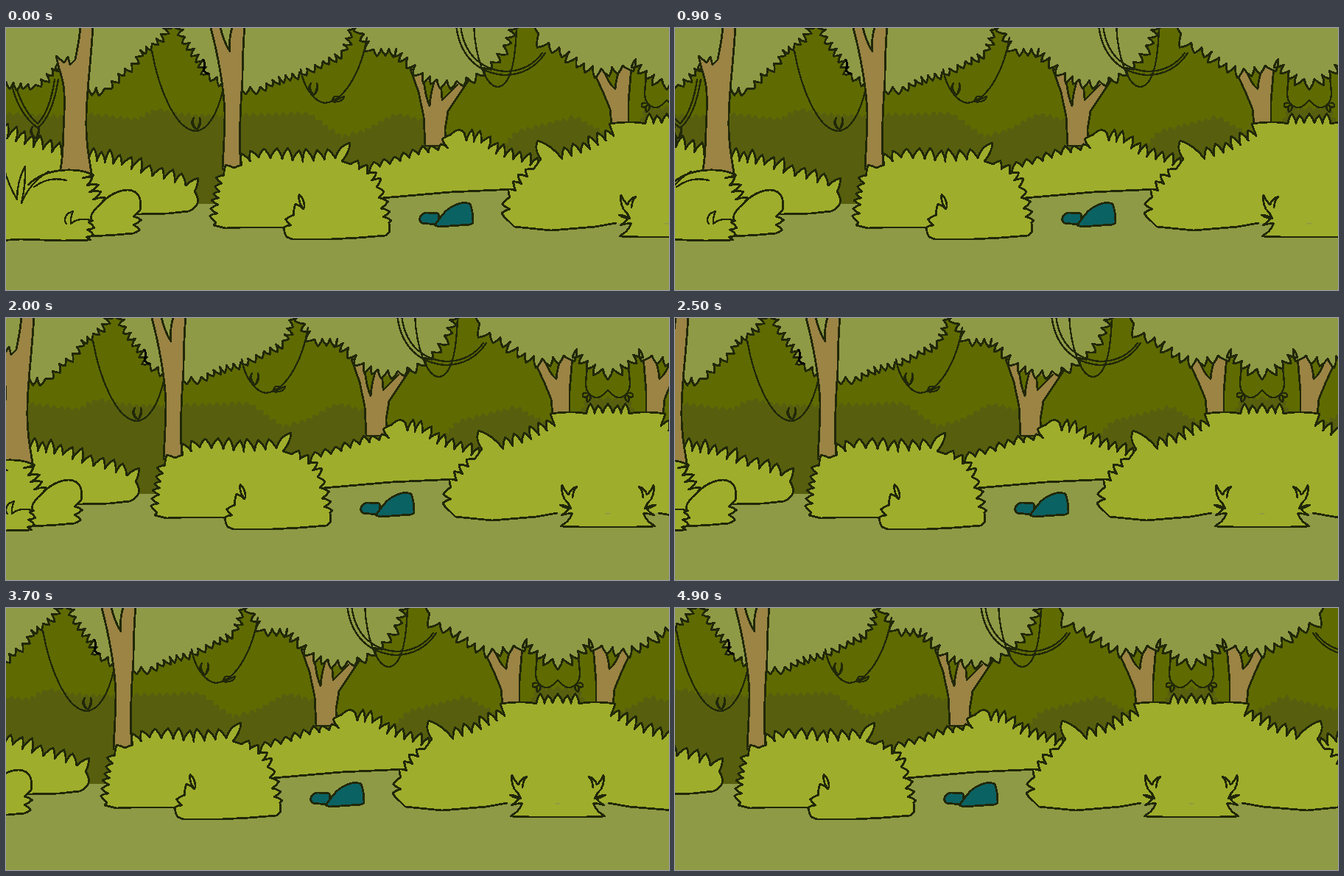
An HTML page that plays this animation: 900x356 px, repeating every 5000 ms.

```html
<!DOCTYPE html>
<html lang="en">
<head>
<meta charset="utf-8">
<title>Jungle pan</title>
<style>
html, body { margin: 0; width: 100%; height: 100%; overflow: hidden; background: #8f9a46; }
svg { display: block; width: 900px; height: 356px; }
#world { animation: pan 5s steps(50, end) infinite; }
@keyframes pan { to { transform: translateX(-200px); } }
</style>
</head>
<body>
<svg viewBox="0 0 900 356" shape-rendering="crispEdges">
  <defs><clipPath id="half"><path d="M-10 -10H897V366H-10Z"/></clipPath></defs>
  <g id="world">
    <g id="scene" clip-path="url(#half)" stroke-width="2.8" stroke-linejoin="round" stroke-linecap="round"></g>
    <use href="#scene" transform="translate(1794 0) scale(-1 1)"/>
  </g>
</svg>
<script>
const NS = 'http://www.w3.org/2000/svg';
const INK = '#212809', SAGE = '#8f9a46', LEAF = '#9fad2c', DEEP = '#5f6b00',
      SHADE = '#575f0e', BARK = '#9b8444', ROCK = '#0b6263';
const scene = document.getElementById('scene');

let seed = 7;
const rand = () => (seed = seed * 16807 % 2147483647) / 2147483647;

function draw(d, fill = 'none', stroke = INK, width = 2.8) {
  const p = document.createElementNS(NS, 'path');
  p.setAttribute('d', d);
  p.setAttribute('fill', fill);
  p.setAttribute('stroke', stroke);
  p.setAttribute('stroke-width', width);
  scene.append(p);
}
const bush = d => draw(d, LEAF);
const canopy = d => draw(d, SAGE);
const vine = d => draw(d, 'none', INK, 2.4);

// Leaves along a guide line: they grow to the left of the path, or right if depth < 0.
function leaves(guide, step, depth) {
  const pts = guide.split(' ').map(s => s.split(',').map(Number));
  const bow = .13 * Math.sign(depth);
  let [x, y] = pts[0], d = `L${x} ${y}`;
  const arc = (x1, y1) => {
    const dx = x1 - x, dy = y1 - y;
    d += `Q${x + dx / 2 + dy * bow} ${y + dy / 2 - dx * bow} ${x1} ${y1}`;
    [x, y] = [x1, y1];
  };
  for (let i = 1; i < pts.length; i++) {
    const [ax, ay] = pts[i - 1], [bx, by] = pts[i];
    const dx = bx - ax, dy = by - ay, len = Math.hypot(dx, dy);
    const count = Math.max(1, Math.round(len / step));
    for (let k = 0; k < count; k++) {
      const t = (k + .35 + rand() * .3) / count, u = (k + 1) / count;
      const h = depth * (.8 + rand() * .4) / len;
      arc(ax + dx * t + dy * h, ay + dy * t - dx * h);
      arc(ax + dx * u, ay + dy * u);
    }
  }
  return d;
}

function sprig(x, y) {
  for (const s of [-1, 1]) vine(`M${x} ${y}q${s * 8 - 3} -7 ${s * 4} -16q${s * 4} 8 ${-s * 4} 16`);
}

// Distant forest
draw('M-10 -10H930V215H300V239H-10Z', DEEP, 'none');
draw('M-10 239' + leaves('-10,118 60,123 110,120 180,127 205,113 243,121 280,122 412,119 455,152 ' +
  '487,142 530,119 569,130 600,170 675,165 695,143 772,124 815,147 862,130 872,112 930,112', 10, 6) +
  'V215H300V239Z', SHADE, 'none');
vine('M8 78Q17 116 43 136Q63 120 71 70M13 78Q24 114 43 130Q60 112 66 70');
sprig(40, 150);

// Forked trees behind the canopy
draw('M549 56L560 87L567 120L569 160H597L596 138L600 113L630 68Z', BARK);
draw('M567 70Q569 92 575 106Q576 91 581 74M590 78Q592 90 592 98Q600 90 613 77', DEEP);
draw('M796 56L810 86L820 110L822 132H845L845 100L849 52Z', BARK);
draw('M811 55Q817 75 827 83Q828 68 834 53', DEEP);

canopy('M-10 -8' + leaves('-10,72 40,77 70,48 90,68 111,80 134,82 152,62 170,48 182,30 198,21 210,8 217,-8', 11, -9));
canopy('M239 -8' + leaves('239,-8 243,12 268,44 276,62 318,80 345,80 370,66 398,60 430,45 455,31 461,14 468,-8', 11, -9));
canopy('M482 -8' + leaves('482,-8 486,8 499,29 530,28 545,40 566,61 585,70 612,72 638,62 658,46 675,24 686,-8', 12, -11));
vine('M611 -4C616 40 642 61 676 64C703 64 720 52 732 34M617 -4C621 34 643 56 677 59C701 59 717 49 728 34');
vine('M635 -4C637 40 651 80 668 80C686 78 692 42 693 -4');
canopy('M735 -8' + leaves('735,-8 723,8 737,20 765,32 785,48 808,55 837,51 855,42 870,58 890,69 904,69 930,56', 14, -13) + 'V-8');
draw('M268 43Q271 49 268 57Q271 62 275 62', 'none', '#000', 3);

vine('M198 31C207 82 230 139 258 140C276 138 288 112 294 86');
sprig(259, 138);
vine('M400 56C404 82 420 101 433 102C464 98 484 50 490 13');
sprig(418, 91);
vine('M442 100q3 -10 9 -6q-2 7 -9 6q9 -3 17 -7q-2 9 -17 7');
vine('M869 68C867 85 865 97 872 103C881 113 889 107 897 98M872 103q-10 -4 -9 4q5 2 9 -4q-5 5 -3 11q7 -3 3 -11');

// Left bank
bush('M-10 285' + leaves('-10,146 25,158 75,172 112,179 157,186 183,197 214,205 244,214 256,222', 13, 16) +
  'Q268 240 248 249L220 252L180 253H120L100 285H-10');
draw(`M101 -4C100 18 96 30 94 43L87 50L84 39L79 47L68 38L72 55C79 75 80 85 79 118
  C77 150 78 180 73 196L117 202C112 175 108 150 109 120C110 80 116 40 118 -4Z`, BARK);
draw('M277 -4C286 30 295 70 297 115C297 145 295 165 294 192L319 192C316 155 318 110 321 70Q321 35 324 -4Z', BARK);
draw('M290 -4Q296 20 304 32Q302 13 308 -4', SAGE);
bush('M124 243Q145 220 166 220Q186 222 182 248' + leaves('173,256 173,279', 11, 9) + 'L150 281L116 283L108 260');
bush('M30 213Q50 194 82 193Q104 192 119 200' + leaves('104,204 110,214 113,223 124,243', 10, 13) +
  'Q112 255 117 262' + leaves('112,264 109,284', 10, 8) + 'L115 288L78 289L20 287L-10 289');
vine('M-3 190Q4 215 15 233Q15 207 26 188Q27 212 21 238Q33 209 58 195M38 216Q58 201 82 207');
vine('M82 266Q77 260 84 252L91 249Q87 258 88 266Q99 256 118 262');

// Middle and right
bush('M490 231' + leaves('494,192 535,181 560,172 600,163 604,145', 13, 9) + 'Q614 134 622 142' +
  leaves('625,153 645,156 665,171 700,182 735,195', 13, 14) + 'L690 219L603 223L511 231');
bush('M375 271L320 271L298 272L282 268' + leaves('285,264 288,240 290,222 296,200 309,190', 12, 9) +
  leaves('320,186 343,176 375,178 403,182 447,177', 16, 15) + 'Q452 160 467 156Q466 170 456 181' +
  leaves('468,185 490,198 503,216 509,245 515,268', 12, 10) + 'L515 282L400 284Z');
bush('M520 265L521 277L515 282L478 285L440 287L389 287' + leaves('381,284 387,268 391,254 404,246', 12, 10) +
  'Q396 236 398 226Q406 234 405 244');
bush('M828 265L800 270L740 275L690 270' + leaves('682,262 684,246 684,230 700,212 716,192', 13, 10) +
  'L726 178Q716 164 722 153Q742 160 755 178' + leaves('755,178 793,165 825,147', 13, 14) +
  'L819 130Q850 126 868 130' + leaves('868,130 890,129 904,129 930,130', 12, 13) + 'V265');
bush('M849 244Q850 234 855 229Q846 232 844 240Q838 235 835 227Q833 236 838 246' +
  leaves('838,246 832,254 834,268 840,278', 11, 14) + 'L833 283L860 284H930');

draw('M584 267L564 265L561 260Q564 251 571 251L587 252L588 263Z', ROCK);
draw('M582 268C593 252 601 240 623 237L630 239Q634 249 634 265L630 267L588 270Z', ROCK);
</script>
</body>
</html>
```
